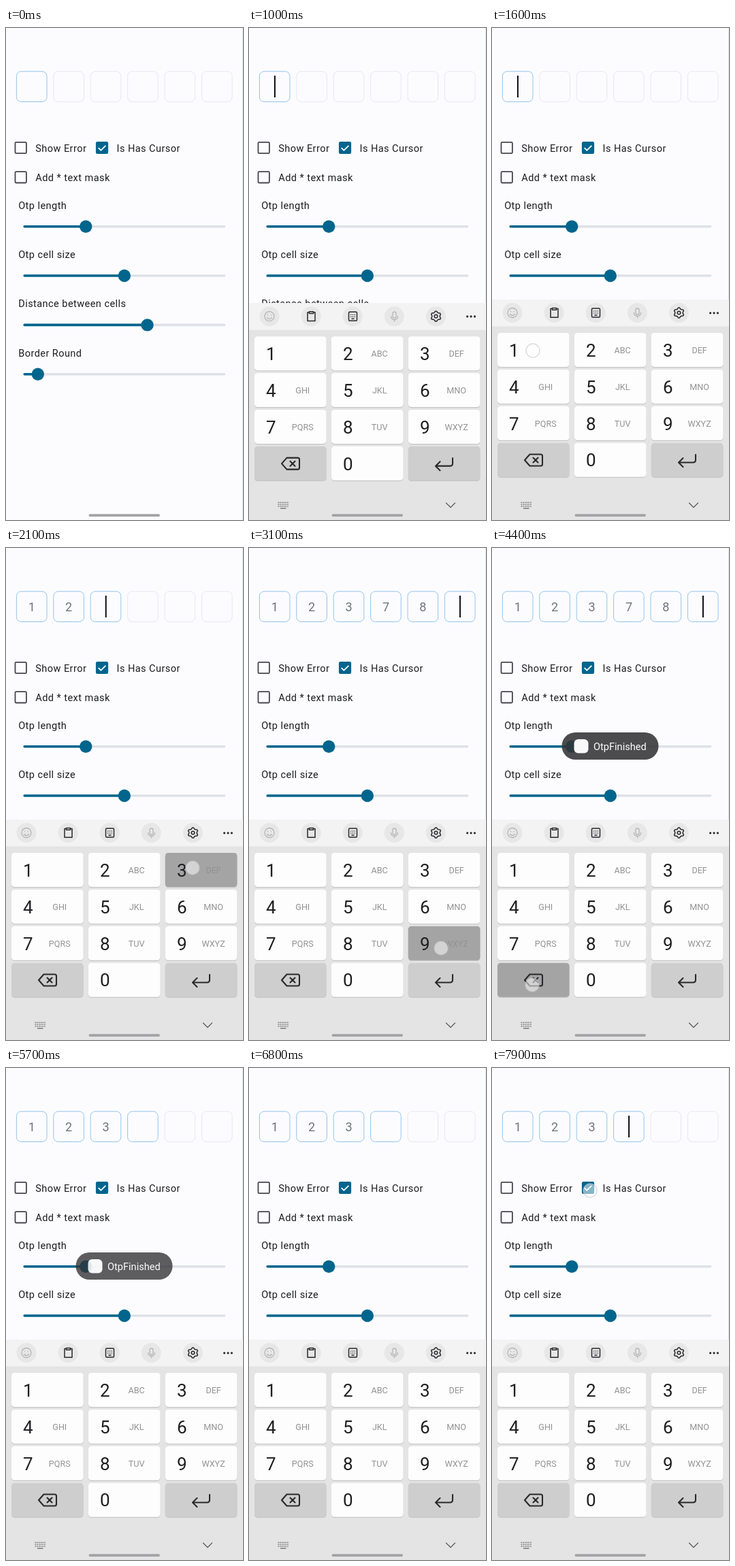
Recreate the animation shown at these times as an HTML page. Size 348x723 px, loop 8 s.

```html
<!DOCTYPE html>
<html lang="en">
<head>
<meta charset="utf-8">
<title>OTP input</title>
<style>
  html, body { margin: 0; width: 100%; height: 100%; overflow: hidden; background: #fcfcff; }
  svg { display: block; width: 348px; height: 723px; font-family: Roboto, sans-serif; }
  .label { font-size: 14.5px; letter-spacing: .453px; fill: #1b1c1e; }
  .mid { text-anchor: middle; }
  .icon { fill: none; stroke: #29292b; stroke-width: 1.5; stroke-linecap: round; stroke-linejoin: round; }
</style>
</head>
<body>
<svg id="stage" viewBox="0 0 348 723"></svg>
<script>
const LOOP = 8000;
const BLUE = '#00658c';
const stage = document.getElementById('stage');

function add(parent, tag, attrs, text) {
  const el = document.createElementNS('http://www.w3.org/2000/svg', tag);
  for (const k in attrs) el.setAttribute(k, attrs[k]);
  if (text !== undefined) el.textContent = text;
  parent.appendChild(el);
  return el;
}
const rect = (p, x, y, width, height, rx, fill, more) =>
  add(p, 'rect', { x, y, width, height, rx, fill, ...more });
const circle = (p, cx, cy, r, fill, more) => add(p, 'circle', { cx, cy, r, fill, ...more });
const text = (p, x, y, str, more) => add(p, 'text', { x, y, ...more }, str);
const icon = (p, d, more) => add(p, 'path', { d, class: 'icon', ...more });
const show = (el, o) => el.setAttribute('opacity', o);
const clamp = v => Math.min(1, Math.max(0, v));

// ---- page ----
rect(stage, 0, 0, 348, 723, 0, '#fcfcff');
rect(stage, 347, 0, 1, 723, 0, '#dde1e4');

const cells = Array.from({ length: 6 }, (_, i) => {
  const x = 15.4 + i * 54.4;
  return {
    mid: x + 22.5,
    box: rect(stage, x, 63.8, 44.6, 44.6, 6.8, '#fcfcff', { 'stroke-width': 1 }),
    digit: text(stage, x + 22.4, 93.2, '', { class: 'mid', 'font-size': 18.1, fill: '#70747e' })
  };
});
const cursor = rect(stage, 0, 70, 2, 32, 0, '#0c0c0e');

function checkbox(x, y, label, checked) {
  rect(stage, x - 8.2, y - 8.2, 16.4, 16.4, 1.4, checked ? BLUE : 'none',
    { stroke: checked ? BLUE : '#45474c', 'stroke-width': 1.8 });
  if (checked) icon(stage, `M${x - 5.3} ${y + .2}l3.6 3.6 7-7`,
    { style: 'stroke:#fff;stroke-width:1.8;stroke-linecap:butt;stroke-linejoin:miter' });
  text(stage, x + 21.6, y + 5.8, label, { class: 'label' });
}
checkbox(21.7, 176, 'Show Error');
checkbox(141, 176, 'Is Has Cursor', true);
checkbox(21.7, 219.3, 'Add * text mask');

[['Otp length', 117.2], ['Otp cell size', 173.8],
 ['Distance between cells', 207.5], ['Border Round', 46.8]].forEach(([label, x], i) => {
  const y = 291.7 + i * 72.35;
  const line = (end, stroke) => add(stage, 'path',
    { d: `M27.2 ${y}H${end}`, stroke, 'stroke-width': 3.6, 'stroke-linecap': 'round' });
  text(stage, 18.2, y - 26, label, { class: 'label' });
  line(320.6, '#dfe1e8');
  line(x, BLUE);
  circle(stage, x, y, 9.2, BLUE);
});

// ---- toast ----
const toast = add(stage, 'g');
rect(toast, 102.5, 271, 142, 40, 20, '#343436', { 'fill-opacity': .88 });
rect(toast, 120.5, 281, 21, 20.5, 6, '#f8f8f8');
text(toast, 149, 296.6, 'OtpFinished', { 'font-size': 14.6, fill: '#fff' });

// ---- keyboard ----
const board = add(stage, 'g');
rect(board, 0, 399, 348, 40, 0, '#f3f3f4');
rect(board, 0, 438.5, 348, 330, 0, '#e4e4e5');

for (let i = 0; i < 5; i++) circle(board, 30 + i * 61.1, 418.5, 14.5, '#e7e7e8');
const pale = { style: 'stroke:#b6b6b8;stroke-width:1.3' };
icon(board, 'M23 418.5a7 7 0 1 0 14 0a7 7 0 1 0 -14 0M26.5 420.5q3.5 4 7 0M27.6 416.3v.4M32.4 416.3v.4', pale);
icon(board, 'M87.5 412.5h-1.5v12.8h11v-12.8h-1.5M88.5 411.5h6v2.8h-6z');
icon(board, 'M148 412h9q1.5 0 1.5 1.5v10q0 1.5-1.5 1.5h-9q-1.5 0-1.5-1.5v-10q0-1.5 1.5-1.5z');
icon(board, 'M149.8 416v.1M152.5 416v.1M155.2 416v.1M149.8 419v.1M152.5 419v.1M155.2 419v.1M151 422h3');
icon(board, 'M211 414.5a2.5 2.5 0 0 1 5 0v4a2.5 2.5 0 0 1 -5 0zM208.5 418.5a5 5 0 0 0 10 0M213.5 423.5v2.5', pale);
const gear = Array.from({ length: 24 }, (_, i) => {
  const a = (i - .5) * Math.PI / 12, r = i % 4 < 2 ? 7.5 : 5.9;
  return `${(274.5 + r * Math.sin(a)).toFixed(1)} ${(418.5 - r * Math.cos(a)).toFixed(1)}`;
});
icon(board, `M${gear.join('L')}Z`);
circle(board, 274.5, 418.5, 2.3, 'none', { class: 'icon' });
for (const x of [320.6, 326, 331.4]) circle(board, x, 418.8, 1.6, '#29292b');

const keys = {};
['1', '2 ABC', '3 DEF', '4 GHI', '5 JKL', '6 MNO', '7 PQRS', '8 TUV', '9 WXYZ', 'del', '0', 'enter']
  .forEach((name, i) => {
    const x = 8 + i % 3 * 112.9, y = 448 + Math.floor(i / 3) * 53.9;
    const [main, sub] = name.split(' ');
    const special = main.length > 1;
    const base = special ? '#cecece' : '#fdfdfd';
    rect(board, x, y + 1.2, 105.6, 50, 4.5, '#c6c6c8');
    keys[main] = { base, face: rect(board, x, y, 105.6, 50, 4.5, base) };
    if (!special) text(board, x + 24.4, y + 34.7, main, { class: 'mid', 'font-size': 26, fill: '#1e1e20' });
    if (sub) text(board, x + 70.8, y + 30, sub, { class: 'mid', 'font-size': 12.6, fill: '#939395' });
  });
const bold = { style: 'stroke-width:2.1' };
icon(board, 'M55.5 626.5H71.500q2.500 0 2.500 2.500v12q0 2.500-2.500 2.500H55.500L48 635zM60.500 631.500l7 7M67.500 631.500l-7 7', bold);
icon(board, 'M299 627v7.500q0 4-4 4H274.500M280.500 632l-6.500 6.500 6.500 6.500', bold);

const nav = add(stage, 'g');
for (let r = 0; r < 3; r++)
  for (let c = 0; c < 6; c++) rect(nav, 42.6 + c * 2.7, 696.6 + r * 2.8, 1.5, 1.4, 0, '#69696b');
rect(nav, 46, 705.2, 8.5, 1.3, 0, '#69696b');
icon(nav, 'M289.500 698l6.500 6.500 6.500-6.500', { style: 'stroke:#59595b;stroke-width:1.2' });
rect(stage, 121.5, 714.2, 104.5, 3.8, 1.9, '#a3a3a5');

const dot = circle(stage, 0, 0, 10, '#fff', { 'fill-opacity': .52, stroke: '#c4c4cc', 'stroke-opacity': .6, 'stroke-width': 1.4 });

// ---- timeline: press time, key, finger x, y ----
const taps = [
  [1500, '1', 60, 474], [1800, '2', 165, 473], [2100, '3', 274, 470],
  [2400, '7', 62, 584], [2750, '8', 170, 586], [3100, '9', 282, 588],
  [4100, 'del', 59, 642], [4400, 'del', 59, 642], [4700, 'del', 59, 643],
  [7800, '', 144, 180]
];
const HOLD = 100, ENTRY = 200;
const blinkOff = [[0, 300], [5700, 6200], [6800, 7300]];

function draw(t) {
  let code = '', pressed = '', touch = 0;
  for (const [at, key, x, y] of taps) {
    if (t < at) break;
    const age = t - at;
    if (key && age < HOLD) pressed = key;
    if (age >= ENTRY) code = key === 'del' ? code.slice(0, -1) : code + key;
    touch = key ? clamp((270 - age) / 100) : 1;
    dot.setAttribute('cx', x);
    dot.setAttribute('cy', y);
  }
  show(dot, touch);
  for (const k in keys) keys[k].face.setAttribute('fill', k === pressed ? '#a4a4a5' : keys[k].base);

  cells.forEach((c, i) => {
    c.box.setAttribute('stroke', i <= code.length ? '#92c4ea' : '#e7e8ec');
    const ch = code[i] || '';
    if (c.digit.textContent !== ch) c.digit.textContent = ch;
  });
  const active = cells[code.length];
  if (active) cursor.setAttribute('x', active.mid - 1);
  show(cursor, active && !blinkOff.some(([a, b]) => t >= a && t < b) ? 1 : 0);

  const rise = clamp((t - 550) / 650);
  board.setAttribute('transform', `translate(0 ${(324 * (1 - rise) ** 3.5).toFixed(2)})`);
  show(nav, clamp((t - 550) / 250));

  show(toast, t < 5600 ? clamp((t - 3250) / 550) : 1 - clamp((t - 5600) / 600) ** 1.3);
}

const start = performance.now();
function tick() {
  draw((performance.now() - start) % LOOP);
  requestAnimationFrame(tick);
}
tick();
</script>
</body>
</html>
```
